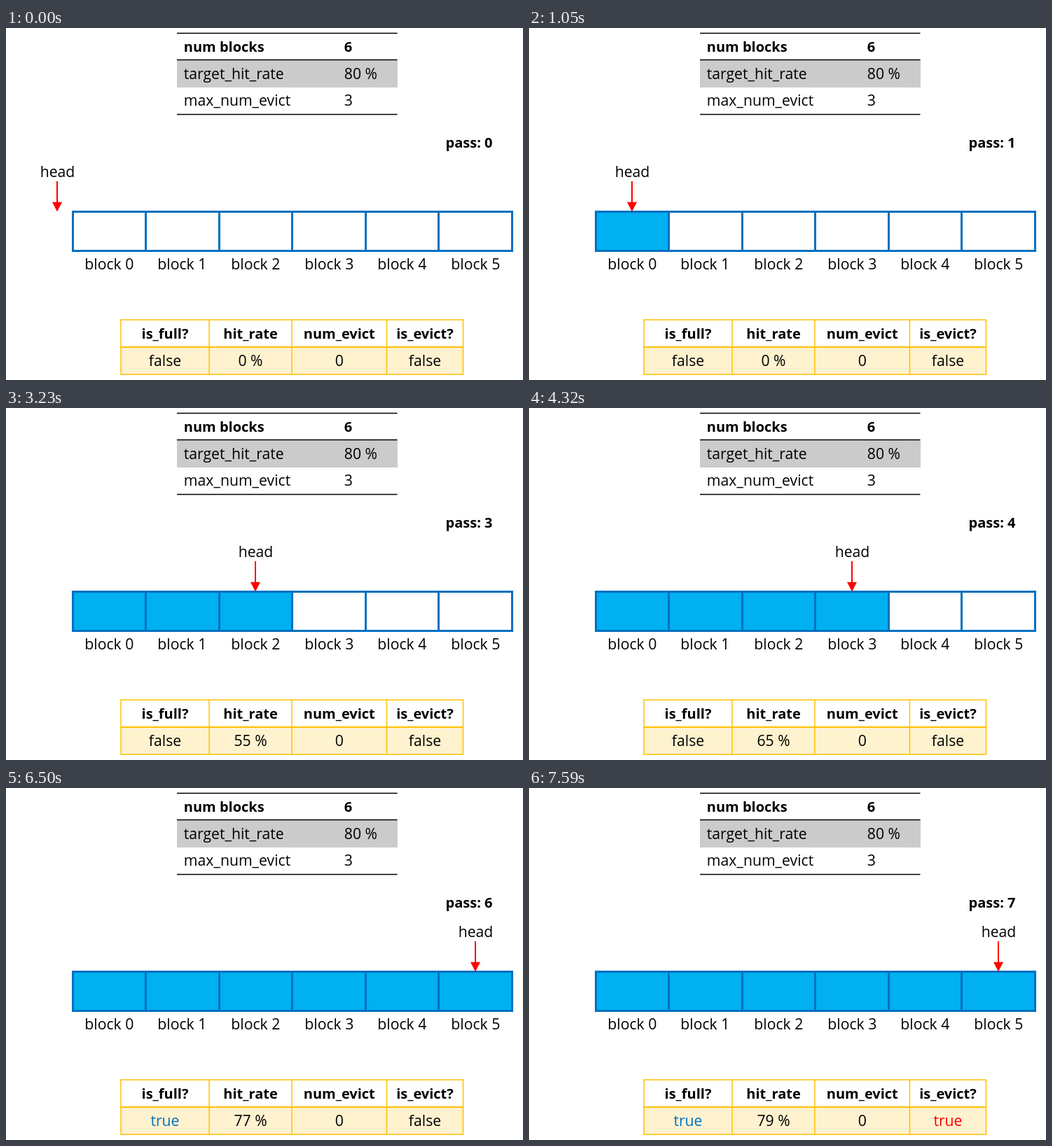
An HTML page with a canvas for the animation above (8000 ms loop, 738x503 px).

```html
<!DOCTYPE html>
<html lang="en">
<head>
<meta charset="utf-8">
<title>Block cache</title>
<style>
  html, body { margin: 0; width: 100%; height: 100%; overflow: hidden; background: #fff; }
  canvas { display: block; }
</style>
</head>
<body>
<canvas id="stage" width="738" height="503"></canvas>
<script>
const ctx = document.getElementById('stage').getContext('2d');

const LOOP = 8000, FIRST = 1050, STEP = 1090;
const BLOCKS = 6, PITCH = 104.5, LEFT = 95.5, TOP = 262.5, BOTTOM = 318.5;
const BLUE = '#0070c0', FILL = '#00b0f0', RED = '#ff0000', GOLD = '#ffc000', INK = '#000';
const HIT_RATE = [0, 0, 40, 55, 65, 72, 77, 79];
const COLUMNS = [164, 290, 408, 543.5, 652.5];
const REGULAR = '21.2px "Open Sans", "Noto Sans", sans-serif';
const BOLD = 'bold 20px "Open Sans", "Noto Sans", sans-serif';

function text(str, x, y, { font = REGULAR, color = INK, align = 'center' } = {}) {
  ctx.font = font;
  ctx.fillStyle = color;
  ctx.textAlign = align;
  ctx.fillText(str, x, y);
}

function rect(x, y, w, h, color) {
  ctx.fillStyle = color;
  ctx.fillRect(x, y, w, h);
}

function line(x1, y1, x2, y2, width, color) {
  ctx.lineWidth = width;
  ctx.strokeStyle = color;
  ctx.beginPath();
  ctx.moveTo(x1, y1);
  ctx.lineTo(x2, y2);
  ctx.stroke();
}

const blockCenter = i => Math.round(146.6 + 104.7 * i);

function drawSettings() {
  rect(244, 46, 315, 39, '#cbcbcb');
  for (const y of [7.5, 45.5, 123.5]) line(244, y, 558.5, y, 1.5, INK);
  const rows = [['num blocks', '6'], ['target_hit_rate', '80 %'], ['max_num_evict', '3']];
  rows.forEach(([name, value], i) => {
    const style = { font: i ? REGULAR : BOLD, align: 'left' };
    const y = [34, 73, 111][i];
    text(name, 253.8, y, style);
    text(value, 482.8, y, style);
  });
}

function drawBlocks(filled) {
  rect(LEFT, TOP, filled * PITCH, BOTTOM - TOP, FILL);
  const right = LEFT + BLOCKS * PITCH;
  for (const y of [TOP, BOTTOM]) line(LEFT - 1.5, y, right + 1.5, y, 3, BLUE);
  for (let i = 0; i <= BLOCKS; i++) {
    const x = Math.ceil(LEFT + i * PITCH) - 0.5;
    line(x, TOP, x, BOTTOM, 3, BLUE);
    if (i < BLOCKS) text('block ' + i, blockCenter(i) + 0.3, 345);
  }
}

function drawHead(x) {
  text('head', x + 0.5, 213);
  line(x, 219, x, 251, 2, RED);
  ctx.fillStyle = RED;
  ctx.beginPath();
  ctx.moveTo(x - 7, 248.7);
  ctx.lineTo(x + 7, 248.7);
  ctx.lineTo(x, 262.5);
  ctx.fill();
}

function drawStatus(pass) {
  const [x0, x1] = [COLUMNS[0], COLUMNS[4]];
  rect(x0, 456, x1 - x0, 39, '#fff2cf');
  for (const x of COLUMNS) line(x, 417, x, 495, 1.5, GOLD);
  for (const y of [417, 495]) line(x0 - 0.7, y, x1 + 0.7, y, 1.5, GOLD);
  line(x0 - 0.7, 456, x1 + 0.7, 456, 2, GOLD);

  const full = pass >= BLOCKS, evict = pass > BLOCKS;
  const cells = [
    ['is_full?', full, full ? BLUE : INK],
    ['hit_rate', HIT_RATE[pass] + ' %', INK],
    ['num_evict', '0', INK],
    ['is_evict?', evict, evict ? RED : INK]
  ];
  cells.forEach(([name, value, color], i) => {
    const x = (COLUMNS[i] + COLUMNS[i + 1]) / 2;
    text(name, x, 444, { font: BOLD });
    text(String(value), x, 483, { color });
  });
}

function draw(now) {
  const t = now % LOOP;
  const pass = t < FIRST ? 0 : 1 + Math.floor((t - FIRST) / STEP);
  const filled = Math.min(pass, BLOCKS);
  rect(0, 0, 738, 503, '#fff');
  drawSettings();
  text('pass: ' + pass, 627.6, 171, { font: BOLD, align: 'left' });
  drawBlocks(filled);
  drawHead(filled ? blockCenter(filled - 1) : 73);
  drawStatus(pass);
}

function tick() {
  draw(performance.now());
  requestAnimationFrame(tick);
}
tick();
</script>
</body>
</html>
```
